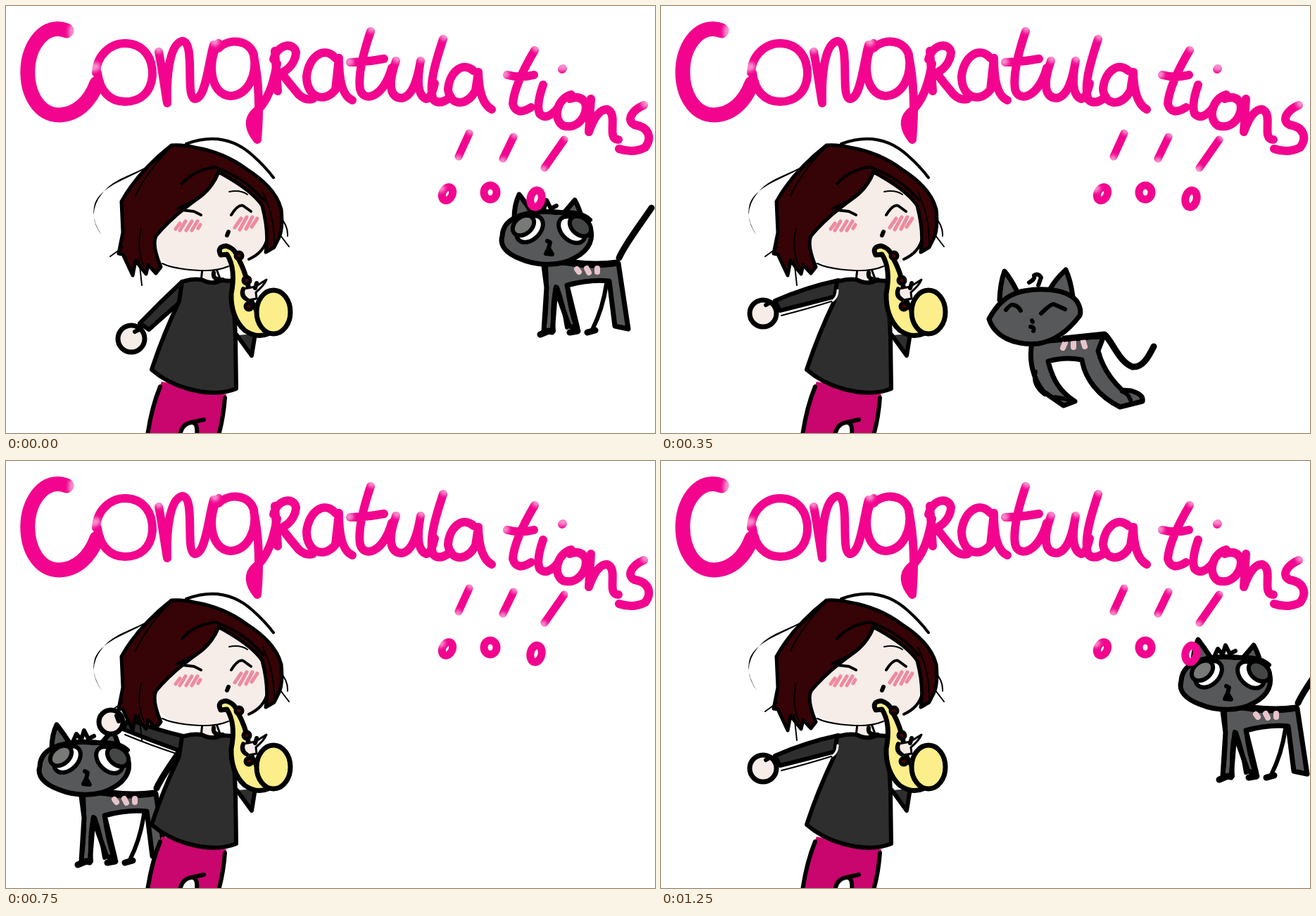
Recreate the animation shown at these times as an HTML page. Size 922 by 607 pixels, loop 1.3 s.

```html
<!DOCTYPE html>
<html lang="en">
<head>
<meta charset="utf-8">
<title>Congratulations</title>
<style>
  html, body { margin: 0; width: 100%; height: 100%; overflow: hidden; background: #fff; }
  svg { display: block; width: 100%; height: 100%; }
  path, ellipse, circle { stroke-linecap: round; stroke-linejoin: round; }
  .ink { fill: none; stroke: #000; stroke-width: 6; }
  .thin { fill: none; stroke: #000; stroke-width: 2; }
  .fat { fill: none; stroke: #000; stroke-width: 9; }
  .fur { fill: #565859; stroke: #000; stroke-width: 7; }
  .eye { stroke: #000; stroke-width: 6; }
  .skin { fill: #f6ece8; stroke: #000; stroke-width: 7; }
  .cloth { fill: #2e2e2e; stroke: #000; stroke-width: 6; }
  .hair { fill: #360306; stroke: #000; stroke-width: 5; }
  .brass { fill: #fbee8b; stroke: #000; stroke-width: 7; }
  .stripe { fill: none; stroke: #e8c3cb; stroke-width: 8; }
  .blush { fill: none; stroke: #ec8ba0; stroke-width: 5; }
  .key { fill: #4a0308; stroke: #000; stroke-width: 5; }
  .title { fill: none; stroke: #f2048f; stroke-width: 12; }
  .fade { fill: none; stroke: #fff; stroke-width: 12; opacity: .55; filter: blur(2.5px); }
</style>
</head>
<body>
<svg viewBox="0 0 922 607" preserveAspectRatio="none">
  <g id="cat">
    <g id="stand">
      <path class="fur" d="M763 362L768 400L764 462L776 464L781 402L800 455L812 458L797 397Q830 388 857 391L865 455L884 459L870 366Q830 372 800 366Z"/>
      <path class="ink" d="M767 370Q770 420 764 462M781 399Q775 430 778 462M783 400Q792 425 797 457M797 398Q801 430 810 457M853 395Q848 430 833 460"/>
      <path class="fat" d="M759 467L771 462M801 464L812 462M826 464L837 461M868 365Q840 369 806 365"/>
      <path class="stripe" d="M811 374L814 378M825 373L828 379M840 373L840 378"/>
      <path class="fat" d="M871 358C880 338 898 315 917 287"/>
      <path class="fur" d="M722 302Q722 282 729 268Q737 278 746 292M791 296L808 276Q813 284 818 301"/>
      <path class="fur" d="M705 327C706 306 724 297 752 293C784 290 820 296 828 310C837 330 829 347 808 358C788 370 756 370 732 360C710 352 701 340 705 327Z"/>
      <path class="ink" d="M753 290L757 281L764 289L768 276L774 288L782 284M720 303Q745 290 782 294Q815 290 830 304"/>
      <ellipse class="eye" cx="744" cy="317" rx="22" ry="15" fill="#fff" transform="rotate(-45 744 317)"/>
      <ellipse class="eye" cx="735" cy="312" rx="17" ry="12" fill="#787a77" transform="rotate(-40 735 312)"/>
      <ellipse class="eye" cx="804" cy="318" rx="22" ry="15" fill="#fff" transform="rotate(45 804 318)"/>
      <ellipse class="eye" cx="816" cy="313" rx="17" ry="12" fill="#454747" transform="rotate(40 816 313)"/>
      <path class="ink" d="M769 334L773 336L771 344L767 352L776 353L772 346"/>
    </g>
    <g id="leap" transform="translate(236 -110)">
      <path class="fur" d="M527 478C522 505 529 530 543 548L572 568L588 562C566 548 556 530 550 505Q575 498 598 503C602 530 622 555 652 570L684 562Q686 552 668 547L655 546C638 530 626 510 621 490L629 469L575 474Z"/>
      <path class="ink" d="M532 520Q527 538 545 552M560 556L583 560M655 548Q664 551 667 560"/>
      <path class="stripe" d="M574 479L571 486M586 478L586 485M600 477L602 484"/>
      <path class="fat" d="M573 473L630 467C640 474 650 506 670 513C684 514 692 500 700 484"/>
      <path class="fur" d="M481 418Q482 393 488 377Q497 388 505 404M553 402Q560 389 575 375Q582 390 585 413"/>
      <path class="fur" d="M466 445C476 426 490 410 516 405C548 399 580 405 591 420Q598 432 595 440C580 460 560 476 536 480C502 483 474 470 466 445Z"/>
      <path class="ink" d="M490 432Q497 423 501 425Q507 426 511 433M540 437Q554 423 558 424L574 431M523 393Q532 388 530 383Q536 379 540 386L536 397M527 447L528 449M525 456Q531 456 529 462"/>
    </g>
  </g>

  <g id="arms">
    <g>
      <path class="cloth" d="M250 392Q220 420 190 451L203 460Q222 443 246 422"/>
      <circle class="skin" cx="178" cy="473" r="19"/>
      <path class="ink" d="M183 463L191 459"/>
    </g>
    <g>
      <path class="cloth" d="M252 390Q205 400 162 419L169 433Q205 424 247 413"/>
      <path class="thin" d="M171 440Q210 430 245 419"/>
      <circle class="skin" cx="145" cy="437" r="19"/>
      <path class="ink" d="M149 425L156 421"/>
    </g>
    <g>
      <path class="cloth" d="M254 392Q205 394 161 392L163 409Q205 413 247 415"/>
      <path class="thin" d="M169 416Q210 417 245 419"/>
      <circle class="skin" cx="145" cy="405" r="18"/>
      <path class="ink" d="M149 393L156 392"/>
    </g>
    <g>
      <path class="cloth" d="M256 392Q212 382 174 367L166 381Q205 397 247 412"/>
      <path class="thin" d="M169 389Q205 404 245 417"/>
      <circle class="skin" cx="149" cy="371" r="17"/>
      <path class="ink" d="M157 362L160 370"/>
    </g>
  </g>

  <g id="girl">
    <path fill="#c8066d" d="M221 534L313 552Q311 580 302 610H272Q274 590 263 592Q250 596 247 610H199Q206 570 221 534Z"/>
    <path class="ink" d="M219 541Q207 570 201 610M311 557Q309 585 302 610"/>
    <path class="ink" d="M247 610Q250 594 263 592Q273 591 271 610M263 592L281 588"/>
    <path class="cloth" d="M328 468L349 497L354 466"/>
    <path class="skin" style="stroke-width:3" d="M279 373L277 391Q290 398 305 390L299 374"/>
    <path class="ink" d="M295 379Q293 390 308 389"/>
    <path class="cloth" d="M250 392Q265 387 278 389Q293 397 306 390L322 391L326 470L327 544Q300 555 262 545Q230 537 207 517Q222 470 246 420Z"/>
    <path id="gap" d="M251 404Q251 414 244 419" fill="none" stroke="#fff" stroke-width="3"/>
    <path fill="#f6ece8" d="M302 230L220 300Q207 320 213 345Q222 373 265 375Q330 380 357 352Q378 325 367 275Z"/>
    <path class="thin" d="M222 366Q238 374 275 376Q300 377 316 370"/>
    <path class="ink" style="stroke-width:4" d="M345 360Q367 350 371 330"/>
    <path class="hair" d="M235 198Q252 197 268 201Q310 208 342 232Q383 258 391 289Q394 318 387 331L381 343L369 350Q374 322 364 284Q350 262 302 236Q294 257 276 271Q235 300 213 327Q207 340 220 371L213 380L202 368L199 381L184 362L180 383L166 353L160 352L166 322L164 278Q187 236 235 198Z"/>
    <path class="ink" style="stroke-width:4" d="M298 229Q268 232 250 253M302 234Q294 258 270 275L244 288M300 230Q340 245 366 276"/>
    <path class="thin" d="M234 201Q200 235 184 270M192 316Q185 345 196 370M365 265Q382 300 381 340M389 300Q401 312 400 327M389 325L402 342M189 360L193 397M166 343L148 356"/>
    <path class="ink" style="stroke-width:4" d="M256 196Q310 176 350 212Q368 228 380 244"/>
    <path d="M230 202C203 240 160 236 137 266Q113 296 136 326Q120 303 126 281C139 247 198 243 228 208Z"/>
    <path class="ink" style="stroke-width:4" d="M249 290L267 292L277 297M320 297Q330 281 337 284L348 292"/>
    <path class="thin" d="M317 264Q333 261 343 268"/>
    <path class="ink" d="M316 321L314 326"/>
    <path class="blush" d="M247 309L241 317M255 306L247 319M264 306L256 319M272 306L264 319M276 311L273 316M334 302L325 315M342 300L332 318M350 300L341 317M357 302L349 314"/>
    <path class="brass" d="M305 354Q299 342 313 341Q326 345 330 359Q340 377 344 398Q345 416 355 431L372 466Q356 473 339 461Q319 442 320 409Q327 374 314 353Z"/>
    <ellipse class="brass" cx="380" cy="435" rx="24" ry="31"/>
    <path class="skin" style="stroke-width:3" d="M338 402L354 399L370 389Q367 397 355 407L356 416L344 418Q336 413 338 402Z"/>
    <path class="ink" d="M337 402Q333 412 342 417M354 401L356 394"/>
    <g class="key"><circle cx="331" cy="355" r="5"/><circle cx="342" cy="390" r="5"/><circle cx="345" cy="427" r="5"/></g>
  </g>

  <g class="title">
    <path stroke-width="21" d="M86 35C56 23 33 55 31 88C29 125 47 155 76 155C100 154 119 137 129 110"/>
    <path d="M128 95C129 70 148 53 170 53C196 54 209 74 208 99C206 124 190 136 169 136C148 136 133 121 130 95"/>
    <path d="M217 65C222 90 225 115 229 138C228 105 231 55 250 50C270 50 254 128 268 132C284 132 287 83 295 55"/>
    <path d="M302 53C286 75 288 126 319 128C346 126 357 95 352 69C346 48 317 45 302 60M352 71C359 105 361 145 357 190C344 174 344 161 353 152C372 137 380 110 385 82"/>
    <path d="M382 64L386 121M380 76C386 53 409 51 412 66C411 82 399 92 391 95Q404 112 416 126Q426 135 436 132"/>
    <path d="M468 74C452 56 430 72 427 100C427 130 452 139 468 119L473 74Q473 126 492 134"/>
    <path d="M518 36Q499 92 503 118C508 138 536 131 548 88M489 80Q510 80 537 75"/>
    <path d="M554 78C543 108 544 131 562 131C578 129 585 102 589 78Q580 126 597 132Q604 132 609 110"/>
    <path d="M621 47C610 80 600 114 607 133Q616 142 632 129"/>
    <path d="M664 92C647 77 629 97 628 119C632 144 656 142 667 120L671 94Q672 137 690 147"/>
    <path d="M751 63Q722 112 720 139Q725 157 746 144M712 98Q731 103 750 98"/>
    <path d="M763 112Q753 141 758 153Q768 164 784 145M790 90L791 89"/>
    <path d="M803 126C783 132 776 159 791 170C812 177 828 154 823 138Q816 126 801 132"/>
    <path d="M831 132L828 179Q840 146 854 147C871 153 852 190 870 190"/>
    <path d="M906 141C890 148 880 162 893 169C914 172 918 188 908 201Q891 210 871 203"/>
    <path stroke-width="11" d="M658 181L643 214M721 186L706 217M793 190L765 230"/>
    <g stroke-width="11">
      <ellipse cx="627" cy="267" rx="7" ry="10" transform="rotate(25 627 267)"/>
      <ellipse cx="688" cy="265" rx="9" ry="10"/>
      <ellipse cx="753" cy="274" rx="8" ry="12" transform="rotate(12 753 274)"/>
    </g>
  </g>
  <path class="fade" d="M95 32L95 42M121 88L128 86M215 59L217 61M295 49L297 51M519 31L520 32M487 79L488 79M555 74L556 75M590 73L591 74M622 42L623 43M753 58L754 59M708 97L709 97M788 86L794 86M908 138L909 139M660 176L661 177M723 181L724 182M797 185L798 186M641 219L642 218M705 222L706 221M762 234L763 233M617 259L618 259"/>
</svg>
<script>
  const STEP = 50, STEPS = 26;
  // Cat path: step, x, y
  const keys = [
    [0, 0, 0], [2, -56, 58], [4, -102, 107], [7, -236, 110], [9, -325, 34],
    [11, -415, -15], [12, -475, 8], [15, -657, 107], [16, -707, 108],
    [19, -856, 1], [21, -960, -20], [21.01, 190, -22], [25, 34, -14], [26, 0, 0]
  ];
  // Arm pose per step: 0 low, 1 middle, 2 level, 3 raised
  const swing = "01232101232101232100012321";
  const leaps = n => (n >= 6 && n <= 10) || (n >= 17 && n <= 21);

  const get = id => document.getElementById(id);
  const cat = get("cat"), stand = get("stand"), leap = get("leap"), gap = get("gap");
  const arms = [...get("arms").children];
  const show = (el, on) => el.setAttribute("display", on ? "inline" : "none");

  function place(n) {
    const i = keys.findIndex(k => k[0] > n);
    const [a, x0, y0] = keys[i - 1], [b, x1, y1] = keys[i];
    const f = (n - a) / (b - a);
    return [x0 + (x1 - x0) * f, y0 + (y1 - y0) * f];
  }

  function draw(n) {
    cat.setAttribute("transform", `translate(${place(n)})`);
    show(stand, !leaps(n));
    show(leap, leaps(n));
    const pose = +swing[n];
    arms.forEach((arm, i) => show(arm, i === pose));
    show(gap, pose === 1);
  }

  const start = performance.now();
  function tick() {
    draw(Math.floor((performance.now() - start) / STEP) % STEPS);
    requestAnimationFrame(tick);
  }
  tick();
</script>
</body>
</html>
```
